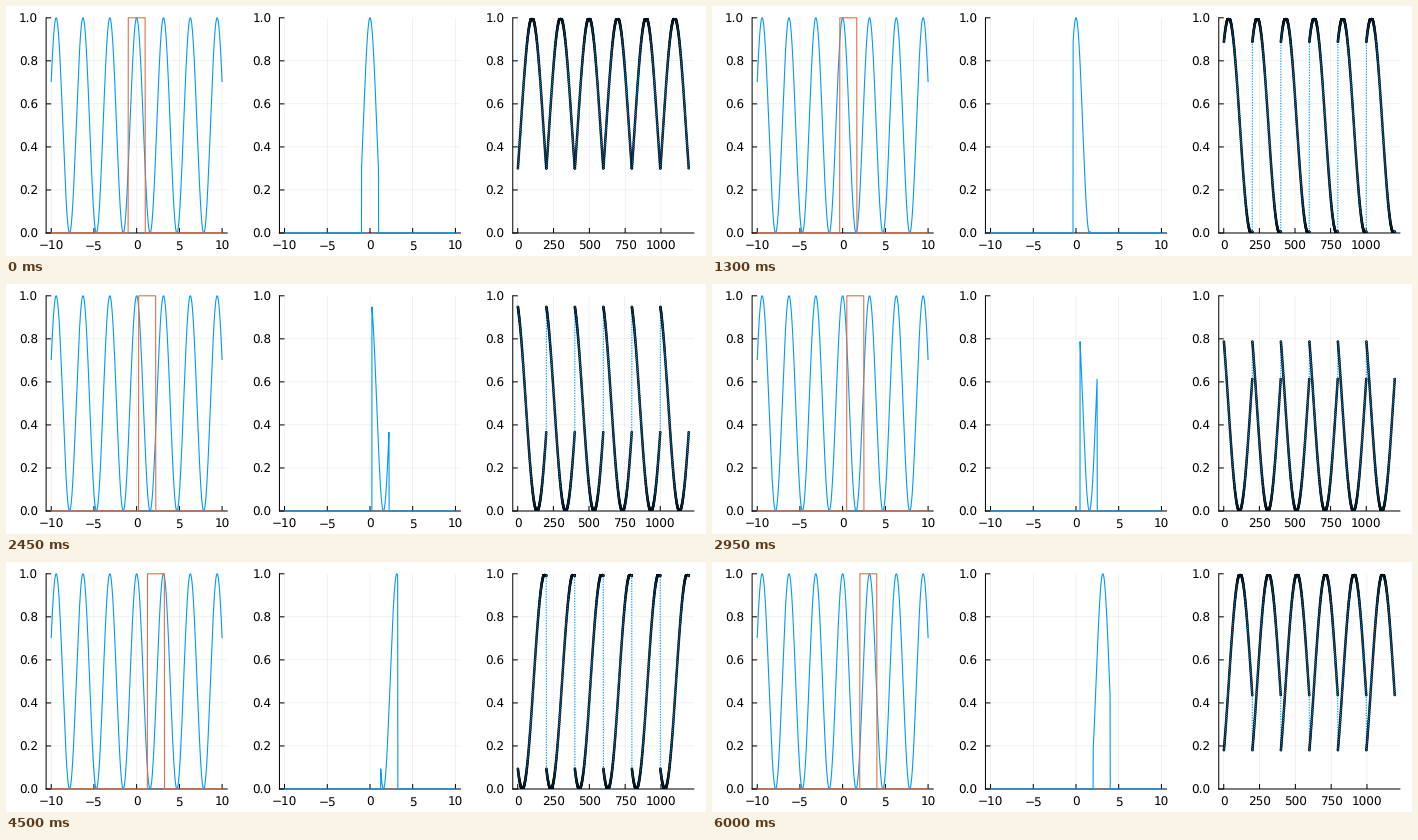
A matplotlib script that plays this animation: 700x250 px, repeating every 6.05 s.

```python
import numpy as np
import matplotlib.pyplot as plt
from matplotlib.animation import FuncAnimation

W, H, DPI = 700, 250, 100
FRAMES, INTERVAL = 121, 50
BLUE, ORANGE = "#009AFA", "#E36F47"
PX = 72 / DPI  # points per pixel
LEFT, TOP, BOTTOM, WIDTH = 40.1, 11.8, 227, 181.1
TICK = 5

plt.rcParams.update({"font.family": "DejaVu Sans", "font.size": 12 * PX,
                     "text.hinting": "none", "path.snap": False})

x = np.arange(-1000, 1001) / 100
wave = np.cos(x) ** 2

fig = plt.figure(figsize=(W / DPI, H / DPI), dpi=DPI, facecolor="white")


def panel(col, xticks):
    left, height = LEFT + col * W / 3, BOTTOM - TOP
    ax = fig.add_axes([left / W, 1 - BOTTOM / H, WIDTH / W, height / H])
    yticks = np.arange(6) / 5
    ax.set(xlim=(-10.6, 10.6), ylim=(0, 1), xticks=xticks, yticks=yticks)
    ax.tick_params(length=0)
    ax.tick_params(axis="x", pad=7.3 * PX)
    ax.tick_params(axis="y", pad=8 * PX)
    ax.grid(color="black", alpha=0.1, lw=0.5 * PX)
    ax.set_axisbelow(True)

    style = dict(color="black", lw=PX, zorder=2.5, clip_on=False)
    ax.vlines(xticks, 0, TICK / height,
              transform=ax.get_xaxis_transform(), **style)
    ax.hlines(yticks, 0, TICK / WIDTH,
              transform=ax.get_yaxis_transform(), **style)
    ax.spines[["top", "right"]].set_visible(False)
    ax.spines[["left", "bottom"]].set_linewidth(PX)
    for spine in ax.spines.values():
        spine.set_snap(False)
    return ax


def curve(ax, color, **style):
    return ax.plot([], [], color=color, lw=1.1 * PX, zorder=3,
                   clip_on=False, **style)[0]


signal_ax = panel(0, range(-10, 11, 5))
cut_ax = panel(1, range(-10, 11, 5))
tiled_ax = panel(2, range(0, 1001, 250))

curve(signal_ax, BLUE).set_data(x, wave)
box = curve(signal_ax, ORANGE)
cut = curve(cut_ax, BLUE)
tiled = curve(tiled_ax, BLUE, ls=(0, (1.2, 1.2)))
# two edge colours keep the dots at subpixel positions
dots = tiled_ax.scatter([], [], s=(2 * PX) ** 2, c=BLUE, lw=0.7 * PX,
                        edgecolors=["black", "black"], zorder=4)


def update(i):
    inside = np.abs(x - i / 40) < 1
    box.set_data(x, inside.astype(float))
    cut.set_data(x, wave * inside)

    y = np.tile(wave[inside], 6)
    n = len(y)
    steps = np.arange(1, n + 1)
    pad = 0.03 * (n - 1)
    tiled.set_data(steps, y)
    dots.set_offsets(np.column_stack([steps, y]))
    tiled_ax.set_xlim(1 - pad, n + pad)
    return box, cut, tiled, dots


anim = FuncAnimation(fig, update, frames=FRAMES, interval=INTERVAL,
                     repeat=True, repeat_delay=0, blit=False)
plt.show()
```
